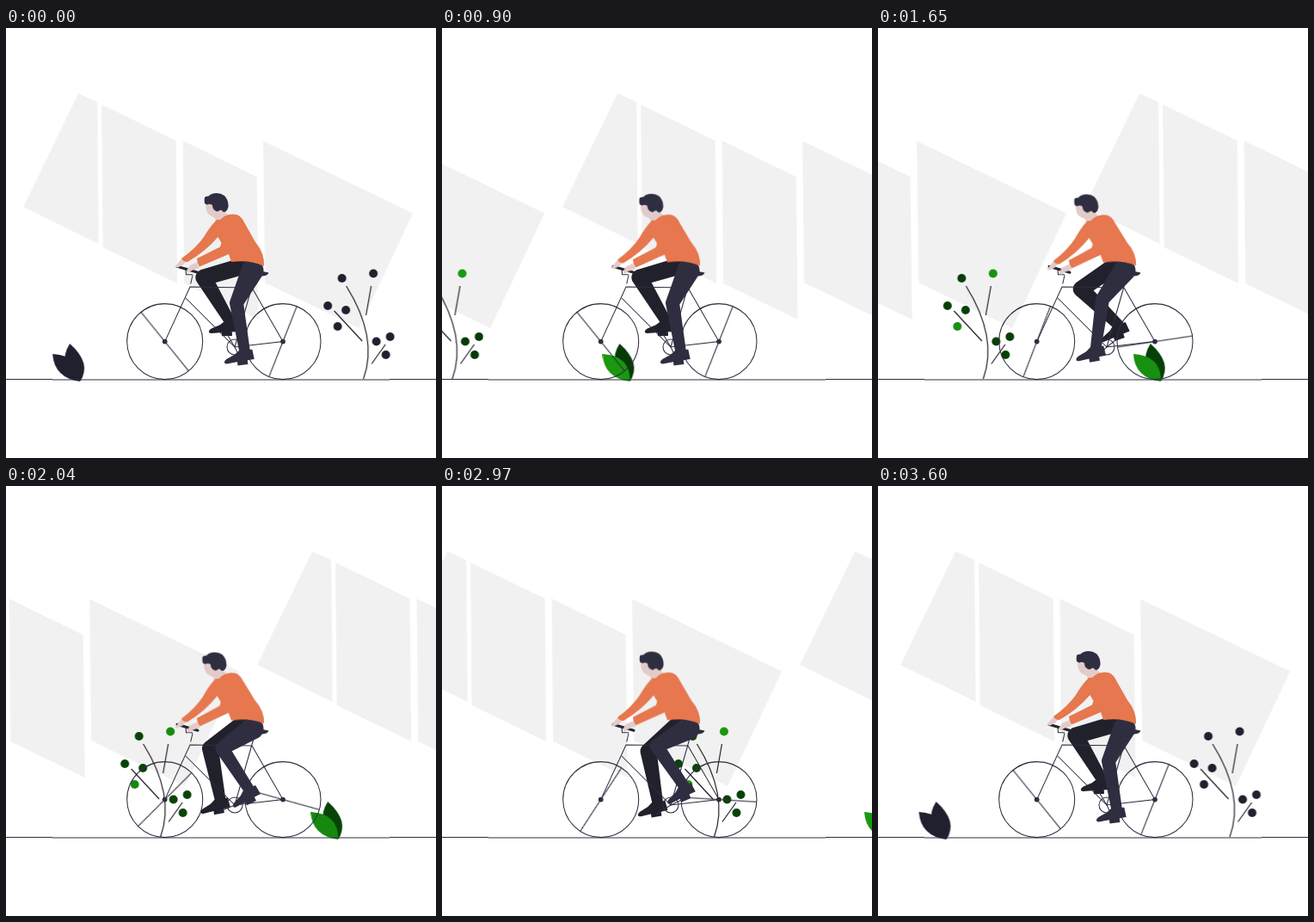
An HTML page that plays this animation: 500 by 500 pixels, repeating every 3630 ms.

```html
<!DOCTYPE html>
<html lang="en">
<head>
<meta charset="utf-8">
<title>Cyclist</title>
<style>
  html, body { margin: 0; width: 100%; height: 100%; overflow: hidden; background: #fff; }
  svg { display: block; width: 100vw; height: 100vh; }
  .line { fill: none; stroke: #2f2e41; stroke-width: 1.05; }
  .stem { fill: none; stroke: #17131c; stroke-width: 1.15; }
  .navy { fill: #2f2e41; }
  .shade { fill: #21212c; }
  .skin { fill: #e2cbc9; }
  .shirt { fill: #e6774e; }
  .panes { fill: #f1f1f1; }
  .light { fill: currentColor; }

  .panes { animation: panes 3630ms linear infinite; }
  .plants { animation: plants 3630ms linear infinite, tint 3630ms linear infinite; }
  .spoke { animation: spin 3630ms linear infinite; }
  .lean { animation: lean 3630ms linear infinite; transform-origin: 283px 272px; }

  @keyframes panes { to { transform: translateX(484px); } }
  @keyframes plants { to { transform: translateX(533.8px); } }
  @keyframes spin { to { transform: rotate(-1452deg); } }
  @keyframes lean {
    0%, 99.17%, 100% { transform: rotate(0deg); }
    0%, 49.59% { animation-timing-function: cubic-bezier(.37, 0, .63, 1); }
    49.59% { transform: rotate(-2.2deg); }
  }
  /* fill tints the dark leaves, color the light ones */
  @keyframes tint {
    0%, 99.17%, 100% { fill: #20202e; color: #20202e; }
    14.88%, 33.88% { fill: #063a06; color: #1a980f; }
    56.2% { fill: #084307; color: #17880f; }
    71.9% { fill: #0a4f06; color: #0a4f06; }
    81.82% { fill: #084307; color: #1a980f; }
  }
</style>
</head>
<body>
<svg viewBox="0 0 500 500">
  <defs>
    <path id="pane" d="M84 76L106 86L107.5 251L20 208Z M111 89L197.5 131L199 297L112.5 255Z
      M205.5 131L291.5 173L293.5 339L207 297Z M299 131.5L473 215.5L410 349L301 296Z"/>
    <path id="shoe" d="M-21 -3Q-21 -5 -18 -6.5L-8 -10.5L-2 -15L13 -14L14 -2.5L-2 -2L-18 -1Q-21 -1 -21 -3Z
      M-6 -3H6V2.5H-6Z"/>
    <g id="plant">
      <path d="M74 367Q100 390 86 411Q58 392 74 367Z"/>
      <path class="light" d="M54 379Q87 381 86 411Q56 407 54 379Z"/>
      <path class="stem" d="M395.5 300Q433 360 415.5 408M381.5 329L414 364M424.5 300L418.5 334M441 368L425 390.5"/>
      <circle cx="390.5" cy="291" r="5"/><circle cx="374" cy="323" r="5"/>
      <circle cx="395" cy="328" r="5"/><circle cx="430.5" cy="364.5" r="5"/>
      <circle cx="446.5" cy="359" r="5"/><circle cx="441.5" cy="380" r="5"/>
      <g class="light">
        <circle cx="427" cy="285.5" r="5"/><circle cx="385.5" cy="347" r="5"/>
      </g>
    </g>
  </defs>

  <g class="panes">
    <use href="#pane"/>
    <use href="#pane" x="-474"/>
  </g>
  <g class="plants">
    <use href="#plant"/>
    <use href="#plant" x="-536"/>
  </g>
  <path class="line" d="M54 408.9H446"/>
  <path class="line" d="M0 408.5H54M446 408.5H500"/>

  <g class="shade">
    <path id="farLeg"/>
    <use id="farShoe" href="#shoe"/>
  </g>

  <g transform="translate(184.7 364.6)">
    <circle class="line" r="44"/>
    <path class="line spoke" d="M-27.4 -34.4L27.4 34.4"/>
    <circle class="navy" r="2.9"/>
  </g>
  <g transform="translate(322 364.6)">
    <circle class="line" r="44"/>
    <path class="line spoke" d="M16.4 -40.8L-16.4 40.8"/>
    <circle class="navy" r="2.9"/>
  </g>
  <path class="line" d="M184.7 364.6L214 301L286 302L322 364.6L266 371L209 314M289 290L266 371
    M209 280L209.5 286.7H217M217 287.5L214.7 297.5"/>
  <circle class="line" cx="266" cy="371" r="9"/>
  <path class="line" id="crank"/>
  <path d="M199 277.3L223 284.3" stroke="#25252f" stroke-width="3" stroke-linecap="round"/>
  <path class="navy" d="M284 284Q295 282 305.5 284.5Q304 288.5 297 288.5L286 290Z"/>

  <g class="navy">
    <path id="nearLeg"/>
    <use id="nearShoe" href="#shoe"/>
  </g>

  <g class="lean">
    <path class="skin" d="M196 278L203.5 269L210 271L206 275.5L200 278.5Z M210 282L214 276L222 272.5L225 279L217 281.5L212 284.5Z"/>
    <path class="skin" d="M232 204Q232 217 239 219L243 221L245 229L260 219L252 211L242 203Z"/>
    <path class="shirt" d="M245 223L249 223Q257 215 268 217Q274 219 277 226L290 249Q301 262 300 277Q284 269 262 272
      L259 263L225 277.5Q222 273 222 268L249 254.5L250.5 250L246.5 243Q232 260 211 272Q206 272 204 268
      Q221 256 230 243Q237 231 245 223Z"/>
    <path class="navy" d="M231 204Q230 197 232 196Q236 196 238 193.5Q247 190 254 195Q259 200 258.5 208
      Q257 214 253 214L250 211.5Q248 212 246 213.5Q240 212 240 206Q237 204 234 205.5Z"/>
  </g>
</svg>
<script>
  const LOOP = 3630, RAD = Math.PI / 180;
  const $ = id => document.getElementById(id);
  const sin = a => Math.sin(a * RAD), cos = a => Math.cos(a * RAD);

  // Rounded limb from a to b with end radii ra and rb
  function taper([ax, ay], [bx, by], ra, rb) {
    const len = Math.hypot(bx - ax, by - ay);
    const nx = (ay - by) / len, ny = (bx - ax) / len;
    return `M${ax + nx * ra} ${ay + ny * ra}L${bx + nx * rb} ${by + ny * rb}` +
      `A${rb} ${rb} 0 0 0 ${bx - nx * rb} ${by - ny * rb}` +
      `L${ax - nx * ra} ${ay - ny * ra}A${ra} ${ra} 0 0 0 ${ax + nx * ra} ${ay + ny * ra}Z`;
  }

  // Two-bone solve with the knee bending forward (left)
  function kneeOf([hx, hy], [ax, ay], thigh, shin) {
    const dx = ax - hx, dy = ay - hy, d = Math.min(Math.hypot(dx, dy), thigh + shin);
    const bend = Math.acos((thigh * thigh + d * d - shin * shin) / (2 * thigh * d));
    const a = Math.atan2(dy, dx) + bend;
    return [hx + thigh * Math.cos(a), hy + thigh * Math.sin(a)];
  }

  // Poses one leg at crank turn d (degrees) and returns its pedal
  function pose(name, d, hip, thigh, shin, hipR, kneeR) {
    const a = 60 - d + 9 - 9 * cos(2 * d - 40);
    const px = 266 + 19.5 * cos(a), py = 372.5 + 19 * sin(a);
    const pitch = -11 - 3 * cos(d) - 8 * sin(d) + 7 * cos(2 * d);
    const ankle = [px + 4 * cos(pitch) + 14 * sin(pitch), py + 4 * sin(pitch) - 14 * cos(pitch)];
    const knee = kneeOf(hip, ankle, thigh, shin);
    $(name + 'Leg').setAttribute('d', taper(hip, knee, hipR, kneeR) + taper(knee, ankle, kneeR, 6.3));
    $(name + 'Shoe').setAttribute('transform', `translate(${px} ${py}) rotate(${pitch})`);
    return `${px} ${py}`;
  }

  let start;
  function draw(now) {
    start ??= now;
    const d = ((now - start) % LOOP) * 0.4;
    const far = pose('far', d + 180, [275, 277], 47, 60, 10, 9.5);
    const near = pose('near', d, [286.5, 282], 42, 56, 13, 8);
    $('crank').setAttribute('d', `M${far}L266 371L${near}`);
    requestAnimationFrame(draw);
  }
  requestAnimationFrame(draw);
</script>
</body>
</html>
```
